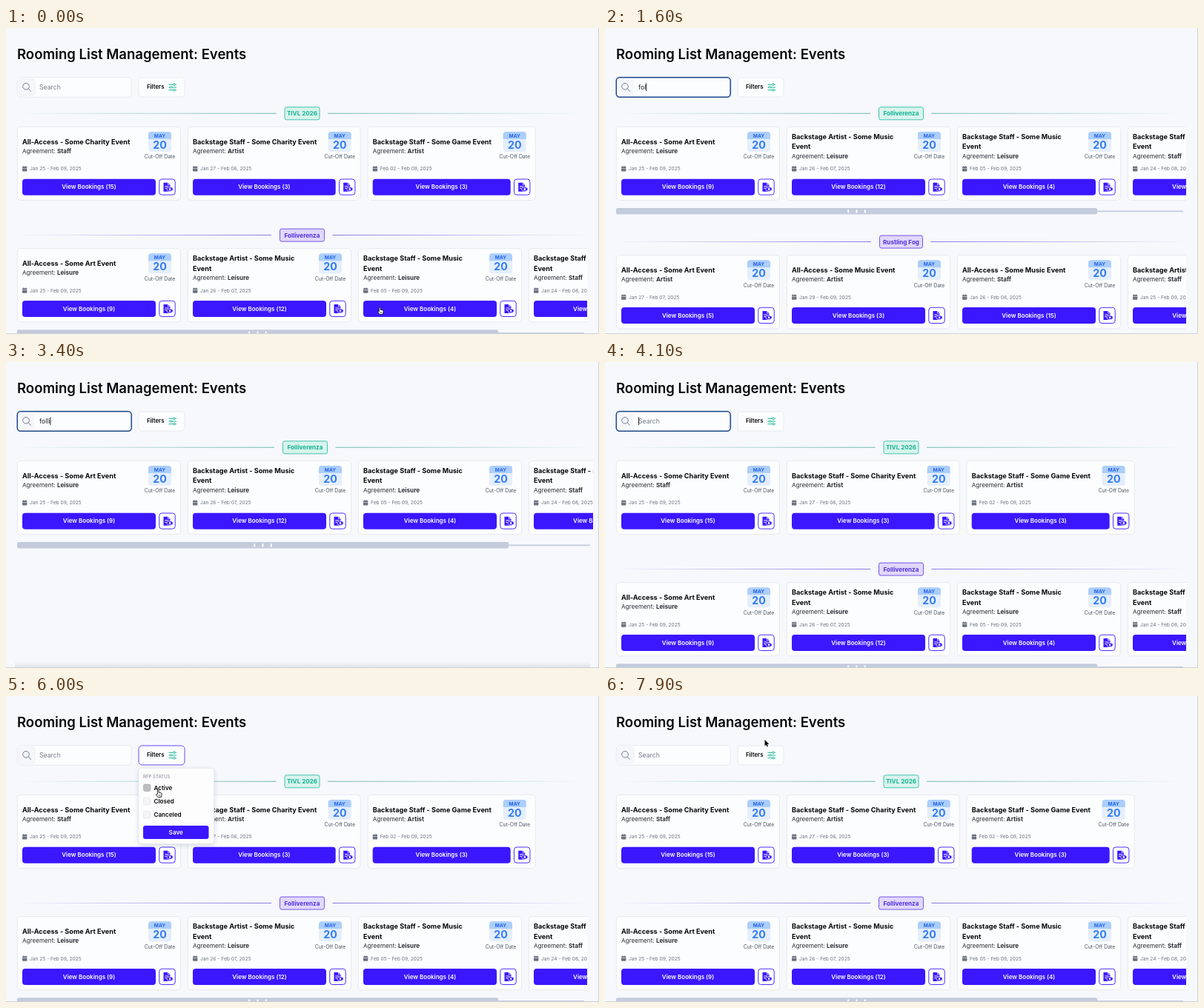
An HTML page with a canvas for the animation above (8 s loop, 800x413 px).

```html
<!DOCTYPE html>
<html lang="en">
<head>
<meta charset="utf-8">
<title>Rooming List Management</title>
<style>
  html, body { margin: 0; width: 100%; height: 100%; overflow: hidden; background: #f6f8fc; }
  canvas { display: block; width: 800px; height: 413px; }
</style>
</head>
<body>
<canvas id="stage"></canvas>
<script>
const W = 800, H = 413, LOOP = 8000;
const canvas = document.getElementById('stage');
const ctx = canvas.getContext('2d');
const dpr = Math.max(1, window.devicePixelRatio || 1);
canvas.width = Math.round(W * dpr);
canvas.height = Math.round(H * dpr);

const INK = '#08080b', VIOLET = '#3a17ff', EDGE = '#e6eaf0', PANEL = '#fcfdfe';
const GREEN = { edge: '#2fbfa5', fill: '#d8f3ed', text: '#12b592', line: '#5fb0a4' };
const PURPLE = { edge: '#6a45e8', fill: '#e0d8fa', text: '#5230dc', line: '#7f6be0' };

const card = (title, deal, dates, count, w = 221) =>
  ({ lines: title.split('|'), deal, dates: dates + ', 2025', count, w });

const cup = { name: 'TIVL 2026', badge: 47, bar: false, cards: [
  card('All-Access - Some Charity Event', 'Staff', 'Jan 25 - Feb 09', 15),
  card('Backstage Staff - Some Charity Event', 'Artist', 'Jan 27 - Feb 06', 3, 233.7),
  card('Backstage Staff - Some Game Event', 'Artist', 'Feb 02 - Feb 09', 3, 227)
] };
const fest = { name: 'Folliverenza', badge: 60, bar: true, cards: [
  card('All-Access - Some Art Event', 'Leisure', 'Jan 25 - Feb 09', 9),
  card('Backstage Artist - Some Music|Event', 'Leisure', 'Jan 26 - Feb 07', 12),
  card('Backstage Staff - Some Music|Event', 'Leisure', 'Feb 05 - Feb 09', 4),
  card('Backstage Staff - Some Music|Event', 'Staff', 'Jan 24 - Feb 08', 10)
] };
const night = { name: 'Rustling Fog', badge: 58, bar: true, cards: [
  card('All-Access - Some Art Event', 'Artist', 'Jan 27 - Feb 07', 5),
  card('All-Access - Some Music Event', 'Artist', 'Jan 29 - Feb 09', 3),
  card('All-Access - Some Music Event', 'Staff', 'Jan 26 - Feb 08', 15),
  card('Backstage Artist - Some Art Event', 'Staff', 'Jan 25 - Feb 09', 12)
] };

const views = {
  all: { sections: [cup, fest], right: 784 },
  pair: { sections: [fest, night], right: 784 },
  single: { sections: [fest], right: 792 }
};

// Timelines: [start, value]
const viewTimes = [[0, 'all'], [1500, 'pair'], [2100, 'single'], [3900, 'all']];
const typed = [[0, ''], [800, ''], [1200, 'f'], [1350, 'fo'], [1550, 'fol'], [1800, 'foll'],
  [2000, 'folli'], [3500, 'foll'], [3600, 'fol'], [3700, 'fo'], [3800, 'f'], [3900, '']];
const path = [[100, 504.3, 377], [450, 151, 62], [600, 148.5, 76], [4350, 148.5, 76],
  [4800, 222, 80], [5300, 222, 80], [5800, 205.3, 127], [6200, 205.3, 127], [6500, 206, 145],
  [6900, 208, 163], [7300, 222, 83], [7500, 222, 83], [7850, 215.5, 59]];

const within = (t, a, b) => t >= a && t < b;
const latest = (list, t) => list.filter(k => k[0] <= t).pop();

function pointerAt(t) {
  const i = path.findIndex(k => k[0] > t);
  if (i === 0) return path[0].slice(1);
  if (i < 0) return path[path.length - 1].slice(1);
  const [t0, x0, y0] = path[i - 1], [t1, x1, y1] = path[i];
  const u = (t - t0) / (t1 - t0), e = u * u * (3 - 2 * u);
  return [x0 + (x1 - x0) * e, y0 + (y1 - y0) * e];
}

function text(str, x, y, size, weight = 400, color = INK, align = 'left') {
  ctx.font = `${weight} ${size}px Inter, "Open Sans", sans-serif`;
  ctx.fillStyle = color;
  ctx.textAlign = align;
  ctx.fillText(str, x, y);
  return ctx.measureText(str).width;
}

function box(x, y, w, h, r, fill, stroke, lw = 1) {
  ctx.beginPath();
  ctx.roundRect(x, y, w, h, r);
  if (fill) { ctx.fillStyle = fill; ctx.fill(); }
  if (stroke) { ctx.strokeStyle = stroke; ctx.lineWidth = lw; ctx.stroke(); }
}

function poly(points, fill, stroke, lw = 1) {
  ctx.beginPath();
  points.forEach(([x, y]) => ctx.lineTo(x, y));
  if (fill) { ctx.closePath(); ctx.fillStyle = fill; ctx.fill(); }
  if (stroke) { ctx.strokeStyle = stroke; ctx.lineWidth = lw; ctx.stroke(); }
}

function ring(x, y, r, fill, stroke, lw = 1) {
  ctx.beginPath();
  ctx.arc(x, y, r, 0, Math.PI * 2);
  if (fill) { ctx.fillStyle = fill; ctx.fill(); }
  if (stroke) { ctx.strokeStyle = stroke; ctx.lineWidth = lw; ctx.stroke(); }
}

function calendar(x, y) {
  const grey = '#6b7280';
  box(x, y + 1, 6.4, 2, [1, 1, 0, 0], grey);
  box(x, y + 3.5, 6.4, 4, [0, 0, 1, 1], grey);
  box(x + 1.3, y, 0.9, 2, 0.4, grey);
  box(x + 4.2, y, 0.9, 2, 0.4, grey);
}

function docIcon(x, y) {
  box(x + 0.3, y + 0.3, 21.4, 21.2, 3.5, '#fff', VIOLET, 0.9);
  const l = x + 6, t = y + 5;
  poly([[l, t], [l + 6, t], [l + 9, t + 3], [l + 9, t + 12], [l, t + 12]], VIOLET);
  poly([[l + 6, t], [l + 6, t + 3], [l + 9, t + 3]], null, '#fff', 0.7);
  box(l + 1.8, t + 4.5, 4.5, 1, 0.3, '#fff');
  box(l + 1.8, t + 7, 2.5, 1, 0.3, '#fff');
  ctx.beginPath();
  ctx.ellipse(l + 8.6, t + 8.7, 4.1, 2.8, 0, 0, Math.PI * 2);
  ctx.fillStyle = VIOLET;
  ctx.fill();
  ctx.strokeStyle = '#fff';
  ctx.lineWidth = 0.8;
  ctx.stroke();
  ring(l + 8.6, t + 8.7, 1.3, '#fff');
}

function drawCard(c, x, y) {
  const right = x + c.w, left = x + 7, mid = right - 28.5;
  box(x + 0.3, y + 0.3, c.w - 0.8, 99.2, 4.5, PANEL, EDGE);
  const two = c.lines.length > 1;
  c.lines.forEach((s, i) => text(s, left, y + (two ? 17 : 23.9) + i * 13.2, 9.15, 700));
  const dealY = y + (two ? 42.7 : 35.6);
  const w = text('Agreement: ', left, dealY, 8.15, 400, '#2c2e35');
  text(c.deal, left + w, dealY, 8.15, 700, '#2c2e35');
  calendar(left, y + 53);
  text(c.dates, left + 10, y + 59.3, 6.65, 400, '#6b7280');

  box(mid - 15.5, y + 7, 31, 27, 4, '#e4eefd');
  box(mid - 15.5, y + 7, 31, 10, [4, 4, 0, 0], '#abcefc');
  text('MAY', mid, y + 14.5, 6.6, 700, '#2563eb', 'center');
  text('20', mid, y + 30, 14.2, 700, '#327df3', 'center');
  text('Cut-Off Date', mid, y + 43.2, 6.9, 400, '#4b5563', 'center');

  const bw = c.w - 41;
  box(left, y + 70.7, bw, 22, 4, VIOLET);
  text(`View Bookings (${c.count})`, left + bw / 2, y + 84.4, 8, 600, '#fff', 'center');
  docIcon(right - 29.5, y + 70.7);
}

function divider(from, to, y, color, flip) {
  const g = ctx.createLinearGradient(from, 0, to, 0);
  g.addColorStop(flip ? 1 : 0, color + '00');
  g.addColorStop(flip ? 0 : 1, color);
  ctx.fillStyle = g;
  ctx.fillRect(from, y, to - from, 0.9);
}

function scrollBar(y, right) {
  const end = right === 784 ? 664 : 678, mid = (15 + end) / 2;
  box(end - 2, y + 3.6, right - 2 - end, 1.6, 0.8, '#c3cbdc');
  box(15, y, end - 15, 8.6, 2, '#c3cbdc');
  for (const d of [-11.3, 0, 11.3]) box(mid + d - 1, y + 2.2, 2, 4.2, 0.5, '#fff');
}

function drawView(view) {
  const { right } = view, mid = (15 + right) / 2;
  let y = 133;
  ctx.save();
  ctx.beginPath();
  ctx.rect(14, 95, right - 14, H - 95);
  ctx.clip();
  view.sections.forEach((s, i) => {
    const tone = i ? PURPLE : GREEN, half = s.badge / 2;
    divider(15, mid - half - 11.5, y - 18.2, tone.line, false);
    divider(mid + half + 11, right, y - 18.2, tone.line, true);
    box(mid - half, y - 26.2, s.badge, 17, 2.5, tone.fill, tone.edge, 0.9);
    text(s.name, mid, y - 14.8, 8.1, 700, tone.text, 'center');
    let x = 15;
    for (const c of s.cards) {
      if (x < right) drawCard(c, x, y);
      x += c.w + 9;
    }
    if (s.bar) scrollBar(y + 110, right);
    y += s.bar ? 173.3 : 164.3;
  });
  ctx.restore();
}

function drawSearch(t) {
  const focus = within(t, 800, 4900), key = latest(typed, t);
  if (focus) box(13.8, 65.3, 156.9, 29.4, 6, '#dbe5f3');
  box(15.3, 66.8, 153.9, 26.4, 4.5, PANEL, focus ? '#234d8c' : EDGE, focus ? 1.5 : 1);
  box(17.5, 69, 21.5, 22, 4, '#f5f7fb', focus ? null : '#e9edf3', 0.8);
  ring(27, 78.8, 4.3, null, '#5d6b82', 0.85);
  poly([[30.2, 82], [33.8, 85.6]], null, '#5d6b82', 0.9);
  const w = text(key[1] || 'Search', 45, 82.6, 8.7, 400, key[1] ? '#22242b' : '#747c8a');
  if (focus && (t - key[0]) % 1000 < 500) {
    ctx.fillStyle = '#111';
    ctx.fillRect(45 + (key[1] ? w : 0), 74.5, 0.9, 10.5);
  }
}

function drawFilters(open) {
  box(179, 67, 62, 26, 4.5, PANEL, open ? '#5238f6' : EDGE, open ? 0.9 : 1);
  text('Filters', 190, 82.4, 7.8, 600);
  [[76.3, 227], [80, 222.5], [83.7, 227]].forEach(([y, x]) => {
    poly([[219.5, y], [230, y]], null, '#18b597', 1);
    ring(x, y, 1.3, PANEL, '#18b597', 0.9);
  });
}

function drawPopover([, py]) {
  ctx.save();
  ctx.shadowColor = 'rgba(30,40,70,.18)';
  ctx.shadowBlur = 7 * dpr;
  ctx.shadowOffsetY = 2 * dpr;
  box(179, 97.5, 101.5, 102, 4, '#fdfdfe');
  ctx.restore();
  box(179, 97.5, 101.5, 102, 4, null, '#e6e9ef', 0.8);
  text('RFP STATUS', 185, 111.2, 6.1, 400, '#7d838e');
  ['Active', 'Closed', 'Canceled'].forEach((label, i) => {
    const y = 123.8 + i * 18.2, hover = Math.abs(py - y) < 9.1;
    box(185.5, y - 4.7, 9.5, 9.4, 2, hover ? '#bbbcbf' : '#f4f5f7', hover ? '#b2b3b6' : '#e5e8ec', 0.8);
    text(label, 199.5, y + 3, 8.1, 600);
  });
  box(185, 175, 88.5, 18, 3, VIOLET);
  text('Save', 229.2, 186.8, 8.1, 600, '#fff', 'center');
}

function drawPointer(x, y, open) {
  const over = (l, t, r, b) => x > l && x < r && y > t && y < b;
  ctx.save();
  ctx.translate(x, y);
  ctx.lineJoin = 'round';
  if (over(15, 66, 170, 94)) {
    poly([[-2, -4.5], [0, -3.7], [2, -4.5]], null, '#222', 0.9);
    poly([[0, -3.7], [0, 3.7]], null, '#222', 0.9);
    poly([[-2, 4.5], [0, 3.7], [2, 4.5]], null, '#222', 0.9);
  } else if (over(178, 66, 241, 94) || (open && over(179, 115, 280, 200)) || over(482, 368, 662, 390)) {
    ctx.beginPath();
    ctx.moveTo(-1, 5.8);
    ctx.lineTo(-1, 0.6);
    ctx.quadraticCurveTo(0, -0.7, 0.9, 0.6);
    ctx.lineTo(0.9, 3.2);
    ctx.lineTo(4.4, 4);
    ctx.quadraticCurveTo(5.2, 4.6, 4.8, 6.2);
    ctx.lineTo(4, 9.6);
    ctx.lineTo(-0.4, 9.6);
    ctx.lineTo(-2.7, 6.3);
    ctx.quadraticCurveTo(-2.3, 4.8, -1, 5.8);
    ctx.closePath();
    ctx.fillStyle = '#fff';
    ctx.fill();
    ctx.strokeStyle = '#111';
    ctx.lineWidth = 0.9;
    ctx.stroke();
    for (const k of [0.9, 2.5]) poly([[k, 6], [k, 8]], null, '#111', 0.6);
  } else {
    const arrow = [[0, 0], [0, 8.4], [1.9, 6.7], [3.1, 9.5], [4.5, 8.9], [3.3, 6.2], [5.8, 6], [0, 0]];
    poly(arrow, null, '#fff', 1.4);
    poly(arrow, '#0a0a0a');
  }
  ctx.restore();
}

function drawEdges(name) {
  if (name === 'single') {
    const g = ctx.createLinearGradient(0, 404, 0, 413);
    g.addColorStop(0, 'rgba(60,70,90,0)');
    g.addColorStop(1, 'rgba(60,70,90,.13)');
    ctx.fillStyle = g;
    ctx.fillRect(12, 404, 776, 9);
  }
  ctx.fillStyle = '#cbd0d8';
  ctx.fillRect(0, 412, W, 1);
  ctx.fillRect(799, 0, 1, H);
}

function draw(t) {
  const name = latest(viewTimes, t)[1], open = within(t, 5000, 7400), at = pointerAt(t);
  ctx.setTransform(dpr, 0, 0, dpr, 0, 0);
  ctx.fillStyle = '#f6f8fc';
  ctx.fillRect(0, 0, W, H);
  text('Rooming List Management: Events', 15, 42.2, 18.55, 600);
  drawView(views[name]);
  drawSearch(t);
  drawFilters(open);
  if (open) drawPopover(at);
  drawEdges(name);
  if (!within(t, 1150, 4400)) drawPointer(at[0], at[1], open);
}

const start = performance.now();
function tick() {
  draw((performance.now() - start) % LOOP);
  requestAnimationFrame(tick);
}
tick();
</script>
</body>
</html>
```
